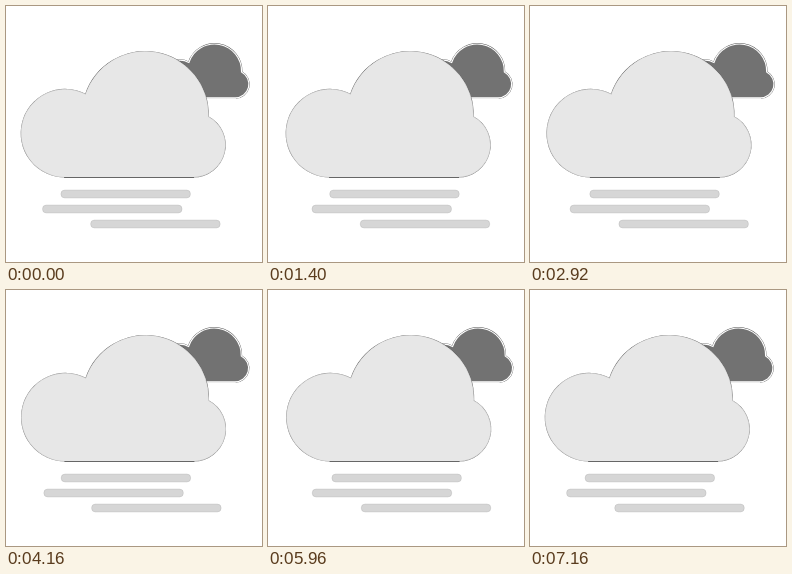
Animation, 256 px wide and 256 px high, one loop 7200 ms. Source, as an HTML page:

```html
<!DOCTYPE html>
<html lang="en">
<head>
<meta charset="utf-8">
<title>Drifting clouds</title>
<style>
  html, body { margin: 0; width: 100%; height: 100%; overflow: hidden; background: #fff; }
  svg { display: block; width: 100vw; height: 100vh; }
</style>
</head>
<body>
<svg viewBox="0 0 256 256">
  <defs>
    <path id="cloud" d="M59 171A43.8 43.8 0 1 1 79.5 88.5A62.9 62.9 0 0 1 202 110.7A32 32 0 0 1 187 171Z"/>
  </defs>
  <g id="far">
    <g transform="translate(148.4 18.4) scale(.43)">
      <use href="#cloud" fill="none" stroke="#555" stroke-width="4"/>
      <use href="#cloud" fill="#727272" stroke="#fff" stroke-width="2.6"/>
      <path d="M57 173H189" stroke="#fff" stroke-width="3"/>
    </g>
  </g>
  <g id="near">
    <use href="#cloud" fill="none" stroke="#666" stroke-width="1.2"/>
    <use href="#cloud" fill="none" stroke="#fff" stroke-width=".6"/>
    <use href="#cloud" fill="#e7e7e7"/>
    <path d="M58 171.5H188" stroke="#666"/>
  </g>
  <g fill="#d6d6d6" stroke="#999" stroke-width=".25">
    <rect id="fog1" x="54.5" y="184" width="129.6" height="8" rx="4"/>
    <rect id="fog2" x="36.5" y="199" width="139.6" height="8" rx="4"/>
    <rect id="fog3" x="84.6" y="214" width="129.6" height="8" rx="4"/>
  </g>
</svg>
<script>
  const LOOP = 7200, SWAY = 3600, STEP = 40;

  // Each part sways sideways: middle offset, half range and delay in ms.
  const parts = [
    { id: 'far', middle: 1, range: 1, delay: 450 },
    { id: 'near', middle: 2, range: 2, delay: 180 },
    { id: 'fog1', middle: 5, range: 5.1, delay: 250 },
    { id: 'fog2', middle: 4.5, range: 4.6, delay: 100 },
    { id: 'fog3', middle: 4.8, range: 5, delay: 160 }
  ].map(part => ({ ...part, node: document.getElementById(part.id) }));

  function draw(ms) {
    const step = Math.floor((ms % LOOP) / STEP) * STEP;
    const time = step < 2 * STEP ? 0 : step; // the first pose is held twice as long
    for (const { node, middle, range, delay } of parts) {
      const x = middle - range * Math.cos(2 * Math.PI * (time - delay) / SWAY);
      node.setAttribute('transform', `translate(${x.toFixed(3)} 0)`);
    }
  }

  const start = performance.now();
  function tick() {
    draw(performance.now() - start);
    requestAnimationFrame(tick);
  }
  tick();
</script>
</body>
</html>
```
